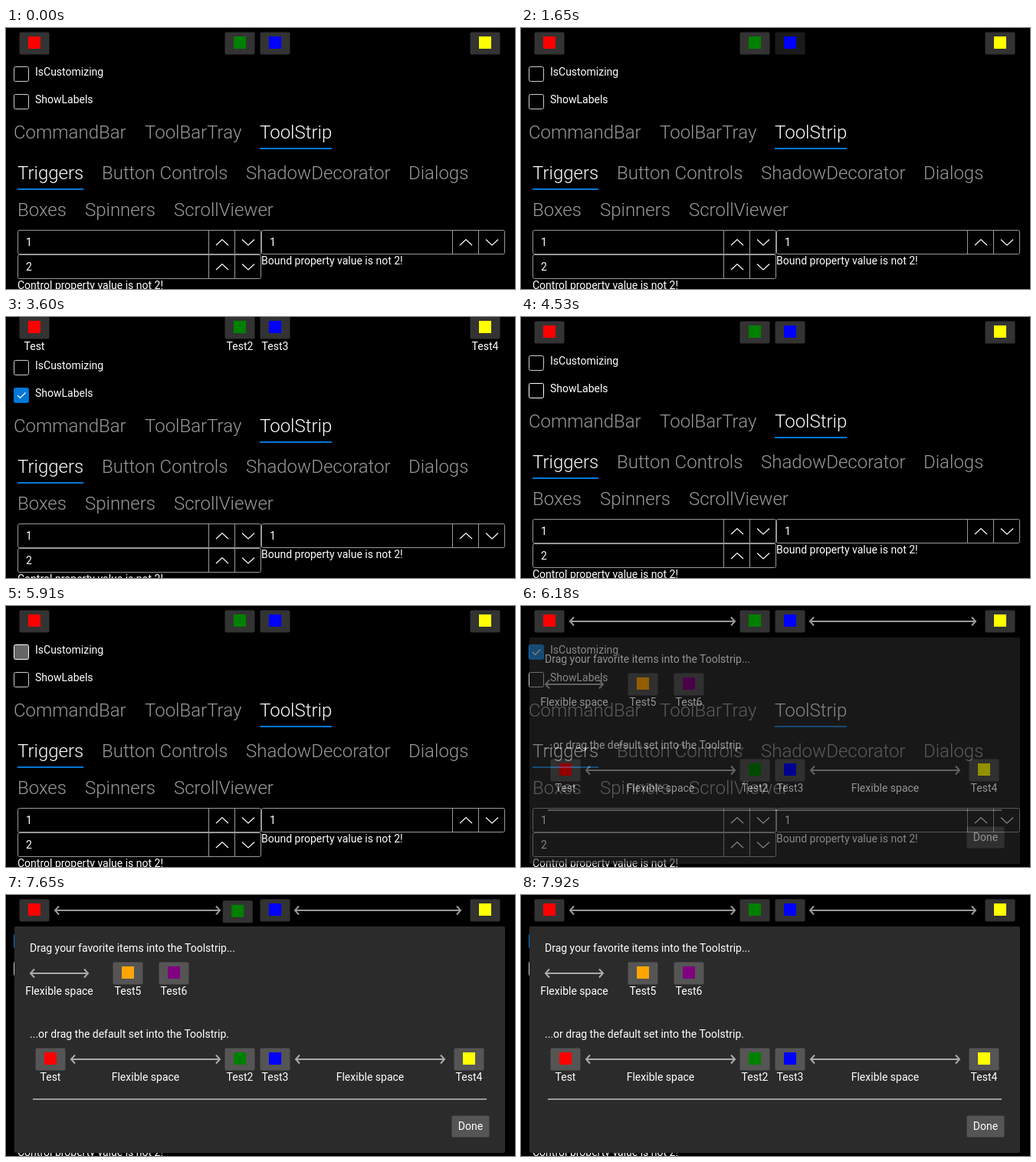
Animation, 664 px wide and 340 px high, one loop 8000 ms. Source, as an HTML page:

```html
<!DOCTYPE html>
<html lang="en">
<head>
<meta charset="utf-8">
<title>ToolStrip demo</title>
<style>
  html, body { margin: 0; width: 100%; height: 100%; overflow: hidden; background: #000; }
  svg { display: block; width: 664px; height: 340px; font: 14px Roboto, sans-serif; fill: #fff; }
  .tab { font-size: 24px; font-weight: 300; fill: #999; }
  .on { fill: #fff; }
  .mid { text-anchor: middle; }
  .line { fill: none; stroke: #fff; stroke-width: 1.2; }
  .frame { fill: none; stroke: #999; }
  .arrow { fill: none; stroke: #fff; stroke-opacity: .6; stroke-width: 2; }
</style>
</head>
<body>
<svg id="stage" viewBox="0 0 664 340"></svg>
<script>
const LOOP = 8000, TICK = 30, ACCENT = '#0078d7';

const text = (x, y, s, cls = '') => `<text x="${x}" y="${y}" class="${cls}">${s}</text>`;
const rect = (x, y, w, h, attrs) => `<rect x="${x}" y="${y}" width="${w}" height="${h}" ${attrs}/>`;

const button = (cx, cy, color, id = '') => `<g id="${id}">` +
  rect(cx - 19.5, cy - 14.5, 39, 29, 'rx="2" class="face" fill-opacity=".2"') +
  rect(cx - 8, cy - 9, 16, 16, `fill="${color}"`) + '</g>';

const item = (cx, cy, color, label) => button(cx, cy, color) + text(cx, cy + 28, label, 'mid');

const arrow = (x1, x2, y) => `<path class="arrow" d="M${x1 + 1} ${y}H${x2 - 1}` +
  `M${x1 + 6} ${y - 5.5}L${x1 + 1} ${y}l5 5.5M${x2 - 6} ${y - 5.5}L${x2 - 1} ${y}l-5 5.5"/>`;

const space = (x1, x2, y) => arrow(x1, x2, y) + text((x1 + x2) / 2, y + 28, 'Flexible space', 'mid');

const checkBox = (id, y, label) => `<g id="${id}">` +
  rect(10.5, y + .5, 19, 19, 'rx="2"') +
  `<path class="line" d="M15 ${y + 10}l3.5 3.5l7-7"/></g>` + text(38, y + 12, label);

const tabs = (y, list) => list.map(([x, s, end]) =>
  text(x, y, s, end ? 'tab on' : 'tab') +
  (end ? rect(x, y + 12, end - x, 2, `fill="${ACCENT}"`) : '')).join('');

const spinner = (x, y, value) => rect(x + .5, y + .5, 317, 31, 'rx="2" class="frame"') +
  `<path class="frame" d="M${x + 249.5} ${y}v32m34 0v-32"/>` +
  `<path class="line" d="M${x + 259} ${y + 20}l8-7.5l8 7.5M${x + 293} ${y + 12.5}l8 7.5l8-7.5"/>` +
  text(x + 11, y + 21, value);

const tools = [[37, 'red', 'Test'], [305, 'green', 'Test2'], [351, 'blue', 'Test3'], [625, 'yellow', 'Test4']];

stage.innerHTML = `
<g id="page">
  ${checkBox('custom', 50, 'IsCustomizing')}
  ${checkBox('labels', 86, 'ShowLabels')}
  ${tabs(144, [[10, 'CommandBar'], [181, 'ToolBarTray'], [331, 'ToolStrip', 425]])}
  ${tabs(197, [[15, 'Triggers', 101], [125, 'Button Controls'], [313, 'ShadowDecorator'], [525, 'Dialogs']])}
  ${tabs(245, [[15, 'Boxes'], [103, 'Spinners'], [219, 'ScrollViewer']])}
  ${spinner(15, 263, 1)}${spinner(333, 263, 1)}${spinner(15, 295, 2)}
  ${text(333, 308, 'Bound property value is not 2!')}
  ${text(15, 340, 'Control property value is not 2!')}
</g>
<g id="dialog">
  ${rect(11, 41, 640, 295, 'rx="2" fill="#2b2b2b"')}
  ${text(31, 74, 'Drag your favorite items into the Toolstrip...')}
  ${space(31, 108, 102)}
  ${item(159, 102, 'orange', 'Test5')}${item(219, 102, 'purple', 'Test6')}
  ${text(31, 186, '...or drag the default set into the Toolstrip.')}
  ${tools.map(([x, color, s], i) => item([58, x, x, 604][i], 214, color, s)).join('')}
  ${space(84, 280, 214)}${space(377, 573, 214)}
  ${rect(35, 265, 592, 2, 'fill="#999"')}
  ${rect(581.5, 287.5, 49, 28, 'rx="2" fill-opacity=".2"')}
  ${text(606, 306, 'Done', 'mid')}
</g>
<g id="strip">
  <g id="gaps">${arrow(63, 280, 20)}${arrow(376, 594, 20)}</g>
  ${tools.map(([x, color]) => button(x, 20, color, color)).join('')}
  <g id="captions">${tools.map(([x, , s]) => text(x, 49, s, 'mid')).join('')}</g>
</g>`;

const el = id => document.getElementById(id);
const show = (id, on) => el(id).style.display = on ? '' : 'none';
const clamp = v => Math.max(0, Math.min(1, v));
const move = (id, x, y) => el(id).setAttribute('transform', `translate(${x} ${y})`);
const shade = (id, a) => el(id).querySelector('.face').setAttribute('fill-opacity', a);

function setCheck(id, checked, pressed, hover) {
  const [box, mark] = el(id).children;
  const fill = pressed ? '#666' : checked ? ACCENT : '#000';
  const grey = Math.round(204 + 51 * hover);
  box.setAttribute('fill', fill);
  box.setAttribute('stroke', checked && !pressed ? ACCENT : `rgb(${grey},${grey},${grey})`);
  mark.style.display = checked ? '' : 'none';
}

function blueShade(t) {
  if (t < 1650 || t >= 2730) return .2;
  if (t < 1950) return .1;
  if (t < 2340) return .1 + .1 * clamp((t - 1890) / 180);
  return .2 - .05 * clamp((t - 2250) / 180);
}

function draw(t) {
  const within = (a, b) => t >= a && t < b;
  const labelled = within(3600, 4530), editing = t >= 6060;

  shade('yellow', within(750, 1050) ? .1 : .2);
  shade('blue', blueShade(t));

  move('page', 0, labelled ? 6 : 0);
  move('strip', 0, labelled ? -6 : 0);
  show('captions', labelled);
  setCheck('labels', labelled, within(3420, 3600) || within(4380, 4530),
    t < 3240 ? 0 : 1 - clamp((t - 4710) / 120));
  setCheck('custom', editing, within(5910, 6060), t >= 5040 ? 1 : 0);

  show('gaps', editing);
  show('dialog', editing);
  el('dialog').setAttribute('opacity', clamp((t - 6060) / 210));

  const drag = Math.sin(Math.PI * clamp((t - 7620) / 300));
  move('green', -9 * drag, 6 * drag);
}

function loop(now) {
  draw(Math.floor(now % LOOP / TICK) * TICK);
  requestAnimationFrame(loop);
}
draw(0);
requestAnimationFrame(loop);
</script>
</body>
</html>
```
